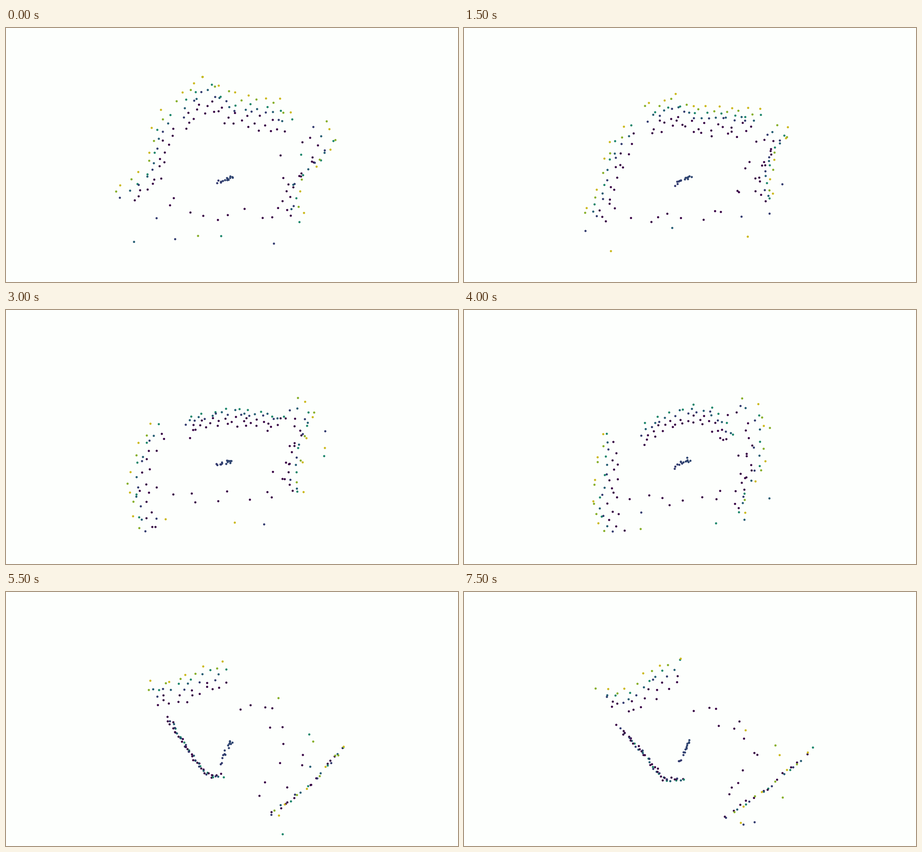
Recreate the animation shown at these times as a matplotlib script. Size 960 by 540 pixels, loop 8 s.

```python
import numpy as np
import matplotlib.pyplot as plt
from matplotlib.animation import FuncAnimation

W, H, DPI = 960, 540, 100
STEPS, INTERVAL = 16, 500
SENSOR = np.array([475, 322])
VANISH = np.array([470, 420])  # wall verticals fan out from here

# Beam levels: how far up the wall each one lands, and its height colour.
RISE = np.array([0, .17, .34, .5, .6, .72, .88, 1])
TONE = np.array([0, 0, 0, .22, .38, .6, .87, 1])
LOW = .65  # height colour reached by low walls

fig = plt.figure(figsize=(W / DPI, H / DPI), dpi=DPI, facecolor="#fdfffd")
ax = fig.add_axes([0, 0, 1, 1])
ax.set_xlim(0, W)
ax.set_ylim(H, 0)
ax.axis("off")
cloud = ax.scatter([], [], s=11, linewidths=0)


class Room:
    def __init__(self, cols, tail, floor):
        self.cols, self.tail, self.floor = cols, np.array(tail), floor
        self.poses = {}

    def pose(self, step, *walls):
        self.poses[step] = walls


def wall(lift, *feet, peak=1):
    return lift, peak, feet


def along(path, u):
    """Points at fractions u of a polyline's length."""
    path = np.array(path, float)
    run = np.r_[0, np.cumsum(np.hypot(*np.diff(path, axis=0).T))]
    return np.column_stack([np.interp(u, run / run[-1], p) for p in path.T])


# Left, back and right walls, seen from a sensor that slowly turns.
hall = Room((5, 9, 5), (447, 332), [(320, 372), (373, 400), (540, 395), (595, 345), (585, 270)])
hall.pose(0,
          wall(.25, (272, 369), (330, 322), (334, 290), (345, 245), (372, 215)),
          wall(.3, (384, 219), (430, 171), (480, 205), (551, 212), (583, 240)),
          wall(.3, (630, 235), (655, 275), (630, 305), (588, 350), (595, 415)))
hall.pose(2,
          wall(.25, (265, 395), (317, 342), (331, 300), (376, 228)),
          wall(.28, (388, 216), (447, 196), (494, 214), (555, 225), (607, 246)),
          wall(.24, (637, 270), (670, 275), (637, 318), (605, 366), (600, 405)))
hall.pose(4,
          wall(.28, (325, 430), (333, 330), (345, 275), (380, 248)),
          wall(.3, (409, 238), (450, 215), (487, 231), (550, 229), (600, 212)),
          wall(.22, (605, 215), (637, 235), (620, 275), (622, 305), (654, 352)))
hall.pose(6,
          wall(.26, (320, 470), (300, 380), (312, 315), (350, 267)),
          wall(.18, (392, 270), (411, 252), (470, 244), (541, 248), (575, 262), peak=LOW),
          wall(.26, (579, 232), (621, 251), (600, 308), (590, 360), (600, 400)))
hall.pose(9,
          wall(.32, (349, 471), (325, 431), (335, 355), (328, 300)),
          wall(.2, (384, 298), (425, 258), (484, 238), (518, 242), (551, 306), peak=LOW),
          wall(.3, (550, 226), (590, 260), (592, 318), (610, 345), (545, 457)))

# After the sharp turn: a low diagonal wall, the back wall and a far edge.
corner = Room((9, 5, 4), (454, 363), [(482, 255), (545, 250), (575, 290), (605, 340), (577, 392), (540, 436)])
corner.pose(10,
            wall(-.1, (341, 255), (372, 312), (410, 368), (428, 388), (460, 388), peak=LOW),
            wall(.27, (326, 242), (379, 235), (438, 210), (474, 214)),
            wall(.02, (560, 472), (650, 405), (715, 318)))
corner.pose(15,
            wall(-.08, (325, 284), (372, 333), (420, 398), (470, 398), peak=LOW),
            wall(.27, (313, 246), (364, 256), (410, 220), (467, 193)),
            wall(.02, (555, 480), (650, 412), (737, 335)))


def mix(a, b, t):
    return a + (b - a) * t


def wall_hits(cols, a, b, t, rng):
    """Staggered columns of beam hits on a wall between two poses."""
    keep = TONE <= a[1]
    rise, tone = RISE[keep] / RISE[keep][-1], TONE[keep]
    n = len(rise)
    stagger = np.arange(n) * .382 % 1
    u = ((np.arange(cols)[:, None] + stagger + rng.uniform(-.15, .15, (cols, n))) / cols).clip(0, 1)
    u, rise, tone = u.ravel(), np.tile(rise, cols), np.tile(tone, cols)
    foot = mix(along(a[2], u), along(b[2], u), t)
    lift = mix(a[0], b[0], t) * (rise + rng.normal(0, .05, rise.size))
    xy = foot + (foot - VANISH) * lift[:, None]
    return np.column_stack([xy + rng.normal(0, 2, xy.shape), tone])


def core_hits(tail, rng, n=14):
    t = np.linspace(0, 1, n) ** 1.6
    xy = mix(SENSOR + (3, -3), tail, t[:, None]) + rng.normal(0, 3, (n, 2))
    return np.column_stack([xy, .27 - .06 * t])


def loose_hits(floor, rng, near=13, far=7):
    """Dark hits on the floor, and a few coloured ones further out."""
    n = near + far
    u = np.r_[(np.arange(near) + rng.random(near)) / near, rng.random(far)]
    reach = np.r_[rng.uniform(.92, 1.15, near), rng.uniform(1.3, 1.9, far)]
    xy = SENSOR + (along(floor, u) - SENSOR) * reach[:, None] + rng.normal(0, 8, (n, 2))
    return np.column_stack([xy, np.r_[np.zeros(near), rng.choice(TONE[3:], far)]])


def sweep(step):
    rng = np.random.default_rng(40 + step)
    room = hall if step < min(corner.poses) else corner
    lo = max(k for k in room.poses if k <= step)
    hi = min(k for k in room.poses if k >= step)
    t = (step - lo) / max(hi - lo, 1)
    parts = [wall_hits(c, a, b, t, rng)
             for c, a, b in zip(room.cols, room.poses[lo], room.poses[hi])]
    return np.vstack(parts + [core_hits(room.tail, rng), loose_hits(room.floor, rng)])


def draw(step):
    pts = sweep(step)
    rgba = plt.cm.viridis(pts[:, 2])
    rgba[:, :3] *= .8
    cloud.set_offsets(pts[:, :2])
    cloud.set_facecolors(rgba)
    return cloud,


anim = FuncAnimation(fig, draw, frames=STEPS, interval=INTERVAL,
                     init_func=lambda: draw(0), repeat=True, repeat_delay=0)
plt.show()
```
